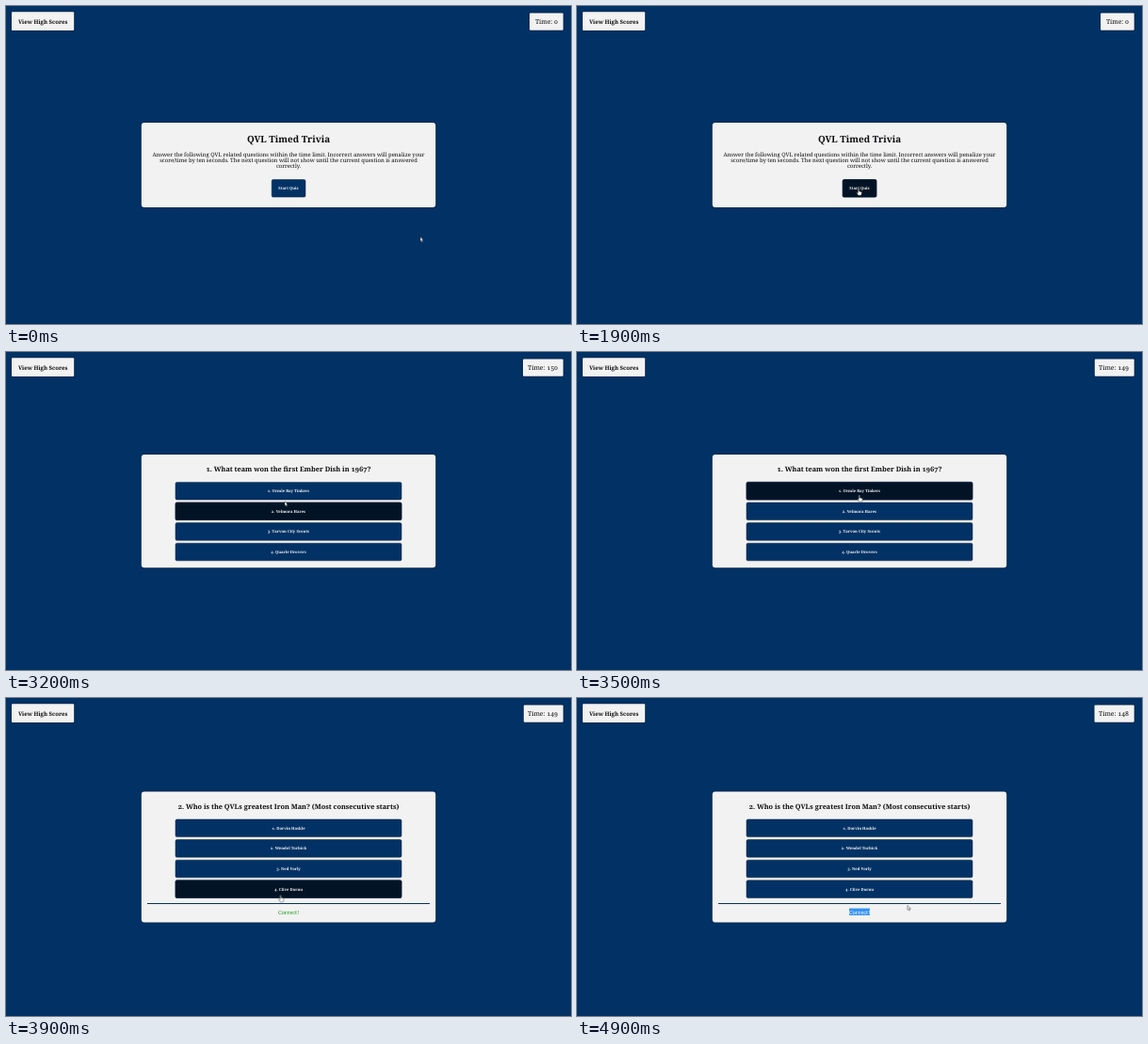
These frames come from a looping animation (600 by 338 pixels, 5000 ms). An HTML page:

```html
<!DOCTYPE html>
<html lang="en">
<head>
<meta charset="utf-8">
<title>Timed Trivia</title>
<style>
  html, body { margin: 0; width: 100%; height: 100%; overflow: hidden; background: #023265; }
  svg { display: block; width: 100vw; height: 100vh; }
  text {
    font: 4.2px "Noto Serif", "DejaVu Serif", serif;
    font-variant-numeric: oldstyle-nums;
    text-anchor: middle;
    text-rendering: geometricPrecision;
    fill: #0c0c0f;
  }
  .bold, .btn text { font-weight: 700; }
  .scores { font-size: 6.05px; }
  .clock text { font-size: 6.8px; text-anchor: end; }
  .title { font-size: 9.9px; }
  .intro-copy text { font-size: 5.9px; }
  .question { font-size: 7.3px; }
  .verdict { font-size: 5.75px; fill: #159a1d; }
  .select text { fill: #fff; }
  .select rect { fill: #3592f5; }
  .panel { fill: #f2f2f2; filter: drop-shadow(0 .4px .8px rgba(0, 0, 0, .55)); }
  .btn text { fill: #f2f2f2; }
  .btn rect { fill: #023265; stroke: #011a38; stroke-width: .5px; }
  .btn .hover { fill: #011325; }

  /* Hard cuts: every .cut is on only inside its own window */
  .cut { animation: 5s step-end infinite; }
  .intro { animation-name: intro; }
  .quiz1 { animation-name: quiz1; }
  .quiz2 { animation-name: quiz2; }
  .t150 { animation-name: t150; }
  .t149 { animation-name: t149; }
  .t148 { animation-name: t148; }
  .h-start { animation-name: h-start; }
  .h1c { animation-name: h1c; }
  .h1b { animation-name: h1b; }
  .h1a { animation-name: h1a; }
  .h2b { animation-name: h2b; }
  .h2c { animation-name: h2c; }
  .h2d { animation-name: h2d; }
  .select { animation-name: select; }
  .arrow { animation-name: arrow; }
  .hand { animation-name: hand; }
  .beam { animation-name: beam; }

  @keyframes intro { 0% { opacity: 1 } 50%, to { opacity: 0 } }
  @keyframes quiz1 { 0% { opacity: 0 } 50% { opacity: 1 } 74%, to { opacity: 0 } }
  @keyframes quiz2 { 0% { opacity: 0 } 74%, to { opacity: 1 } }
  @keyframes t150 { 0% { opacity: 0 } 50% { opacity: 1 } 70%, to { opacity: 0 } }
  @keyframes t149 { 0% { opacity: 0 } 70% { opacity: 1 } 90%, to { opacity: 0 } }
  @keyframes t148 { 0% { opacity: 0 } 90%, to { opacity: 1 } }
  @keyframes h-start { 0% { opacity: 0 } 30%, to { opacity: 1 } }
  @keyframes h1c { 0% { opacity: 1 } 56%, to { opacity: 0 } }
  @keyframes h1b { 0% { opacity: 0 } 56% { opacity: 1 } 66%, to { opacity: 0 } }
  @keyframes h1a { 0% { opacity: 0 } 66%, to { opacity: 1 } }
  @keyframes h2b { 0% { opacity: 1 } 76%, to { opacity: 0 } }
  @keyframes h2c { 0% { opacity: 0 } 76% { opacity: 1 } 78%, to { opacity: 0 } }
  @keyframes h2d { 0% { opacity: 0 } 78% { opacity: 1 } 80%, to { opacity: 0 } }
  @keyframes select {
    0% { opacity: 0; clip-path: inset(0 18% 0 0) }
    88% { opacity: 1; clip-path: inset(0 18% 0 0) }
    90%, to { opacity: 1; clip-path: inset(0) }
  }
  @keyframes arrow {
    0% { opacity: 1 } 30% { opacity: 0 }
    64% { opacity: 1 } 66% { opacity: 0 }
    80% { opacity: 1 } 84% { opacity: 0 }
    90%, to { opacity: 1 }
  }
  @keyframes hand {
    0% { opacity: 0 } 30% { opacity: 1 }
    64% { opacity: 0 } 66% { opacity: 1 }
    80%, to { opacity: 0 }
  }
  @keyframes beam { 0% { opacity: 0 } 84% { opacity: 1 } 90%, to { opacity: 0 } }

  /* The pointer advances once every 100 ms */
  .pointer { animation: pointer 5s step-end infinite; }
  @keyframes pointer {
    0% { transform: translate(440px, 245.5px) }
    16% { transform: translate(439px, 245.5px) }
    18% { transform: translate(438px, 245px) }
    22% { transform: translate(438px, 245px); animation-timing-function: steps(3, start) }
    28% { transform: translate(335px, 208px); animation-timing-function: steps(3, start) }
    34% { transform: translate(299px, 194px) }
    52% { transform: translate(299px, 194px); animation-timing-function: steps(5, start) }
    62% { transform: translate(297px, 166px); animation-timing-function: steps(2, start) }
    66% { transform: translate(296px, 158.7px); animation-timing-function: steps(3, start) }
    72% { transform: translate(299.8px, 152px) }
    76% { transform: translate(299.8px, 152px); animation-timing-function: steps(2, start) }
    80% { transform: translate(291.6px, 209.5px); animation-timing-function: steps(3, start) }
    86% { transform: translate(289px, 228px) }
    88% { transform: translate(289px, 228px); animation-timing-function: steps(4, start) }
    96% { transform: translate(360px, 225px) }
    98%, to { transform: translate(351px, 220.5px) }
  }
  .pointer path { fill: #fff; stroke: #222; stroke-width: .45px; stroke-linejoin: round; }
  .pointer .beam { fill: none; stroke: #111; stroke-width: .6px; }
</style>
</head>
<body>
<svg viewBox="0 0 600 338" preserveAspectRatio="none">
  <rect width="600" height="338" fill="#023265"/>

  <rect class="panel" x="6" y="6.2" width="66.2" height="19.8" rx="1"/>
  <text class="bold scores" x="39.2" y="18.6">View High Scores</text>

  <g class="clock">
    <g class="cut intro">
      <rect class="panel" x="556" y="7.5" width="35.7" height="18.3" rx="1"/>
      <text x="586" y="19">Time: 0</text>
    </g>
    <g class="cut t150">
      <rect class="panel" x="549" y="7.5" width="42.7" height="18.3" rx="1"/>
      <text x="586" y="19">Time: 150</text>
    </g>
    <g class="cut t149">
      <rect class="panel" x="549.8" y="7.5" width="41.9" height="18.3" rx="1"/>
      <text x="586" y="19">Time: 149</text>
    </g>
    <g class="cut t148">
      <rect class="panel" x="549.5" y="7.5" width="42.2" height="18.3" rx="1"/>
      <text x="586" y="19">Time: 148</text>
    </g>
  </g>

  <g class="cut intro">
    <rect class="panel" x="143.8" y="124" width="312.4" height="90" rx="3"/>
    <text class="bold title" x="300" y="144.8">QVL Timed Trivia</text>
    <g class="intro-copy">
      <text x="300" y="159.8">Answer the following QVL related questions within the time limit. Incorrect answers will penalize your</text>
      <text x="300" y="166">score/time by ten seconds. The next question will not show until the current question is answered</text>
      <text x="300" y="172.2">correctly.</text>
    </g>
    <g class="btn">
      <rect x="282.2" y="184.5" width="35.8" height="18.6" rx="1.5"/>
      <rect class="hover cut h-start" x="282.2" y="184.5" width="35.8" height="18.6" rx="1.5"/>
      <text x="300" y="195.4">Start Quiz</text>
    </g>
  </g>

  <g class="cut quiz1">
    <rect class="panel" x="143.8" y="109" width="312.4" height="120.2" rx="3"/>
    <text class="bold question" x="300" y="127.2">1. What team won the first Ember Dish in 1967?</text>
    <g class="btn" transform="translate(180 138.4)">
      <rect width="240" height="18.6" rx="1.5"/>
      <rect class="hover cut h1a" width="240" height="18.6" rx="1.5"/>
      <text x="120" y="10.8">1. Ormle Bay Tinkers</text>
    </g>
    <g class="btn" transform="translate(180 160)">
      <rect width="240" height="18.6" rx="1.5"/>
      <rect class="hover cut h1b" width="240" height="18.6" rx="1.5"/>
      <text x="120" y="10.8">2. Velmora Hares</text>
    </g>
    <g class="btn" transform="translate(180 181.6)">
      <rect width="240" height="18.6" rx="1.5"/>
      <rect class="hover cut h1c" width="240" height="18.6" rx="1.5"/>
      <text x="120" y="10.8">3. Tarvon City Scouts</text>
    </g>
    <g class="btn" transform="translate(180 203.2)">
      <rect width="240" height="18.6" rx="1.5"/>
      <text x="120" y="10.8">4. Quarle Drovers</text>
    </g>
  </g>

  <g class="cut quiz2">
    <rect class="panel" x="143.8" y="99.4" width="312.4" height="139.2" rx="3"/>
    <text class="bold question" x="300" y="117.6">2. Who is the QVLs greatest Iron Man? (Most consecutive starts)</text>
    <g class="btn" transform="translate(180 129)">
      <rect width="240" height="18.6" rx="1.5"/>
      <text x="120" y="10.8">1. Dorvin Haskle</text>
    </g>
    <g class="btn" transform="translate(180 150.6)">
      <rect width="240" height="18.6" rx="1.5"/>
      <rect class="hover cut h2b" width="240" height="18.6" rx="1.5"/>
      <text x="120" y="10.8">2. Wendel Torbick</text>
    </g>
    <g class="btn" transform="translate(180 172.2)">
      <rect width="240" height="18.6" rx="1.5"/>
      <rect class="hover cut h2c" width="240" height="18.6" rx="1.5"/>
      <text x="120" y="10.8">3. Ned Vorly</text>
    </g>
    <g class="btn" transform="translate(180 193.8)">
      <rect width="240" height="18.6" rx="1.5"/>
      <rect class="hover cut h2d" width="240" height="18.6" rx="1.5"/>
      <text x="120" y="10.8">4. Clive Dornu</text>
    </g>
    <rect x="150" y="218" width="300" height="1" fill="#023265"/>
    <text class="verdict" x="300" y="229.6">Correct!</text>
    <g class="cut select">
      <rect x="289" y="223.6" width="22" height="7.4"/>
      <text class="verdict" x="300" y="229.6">Correct!</text>
    </g>
  </g>

  <g class="pointer">
    <path class="cut arrow" d="M0 0V4.7L1.1 3.7L1.8 5.4L2.6 5L1.9 3.4H3.4Z"/>
    <path class="cut hand" d="M-.6 .5Q0-.4 .6 .5V3L3 3.6Q3.5 3.8 3.4 4.6L2.8 7.2H-.4L-2 4.6Q-1.8 3.7-.6 4.7Z"/>
    <path class="cut beam" d="M-1.4-3.6H1.4M0-3.6V3.6M-1.4 3.6H1.4"/>
  </g>
</svg>
</body>
</html>
```
